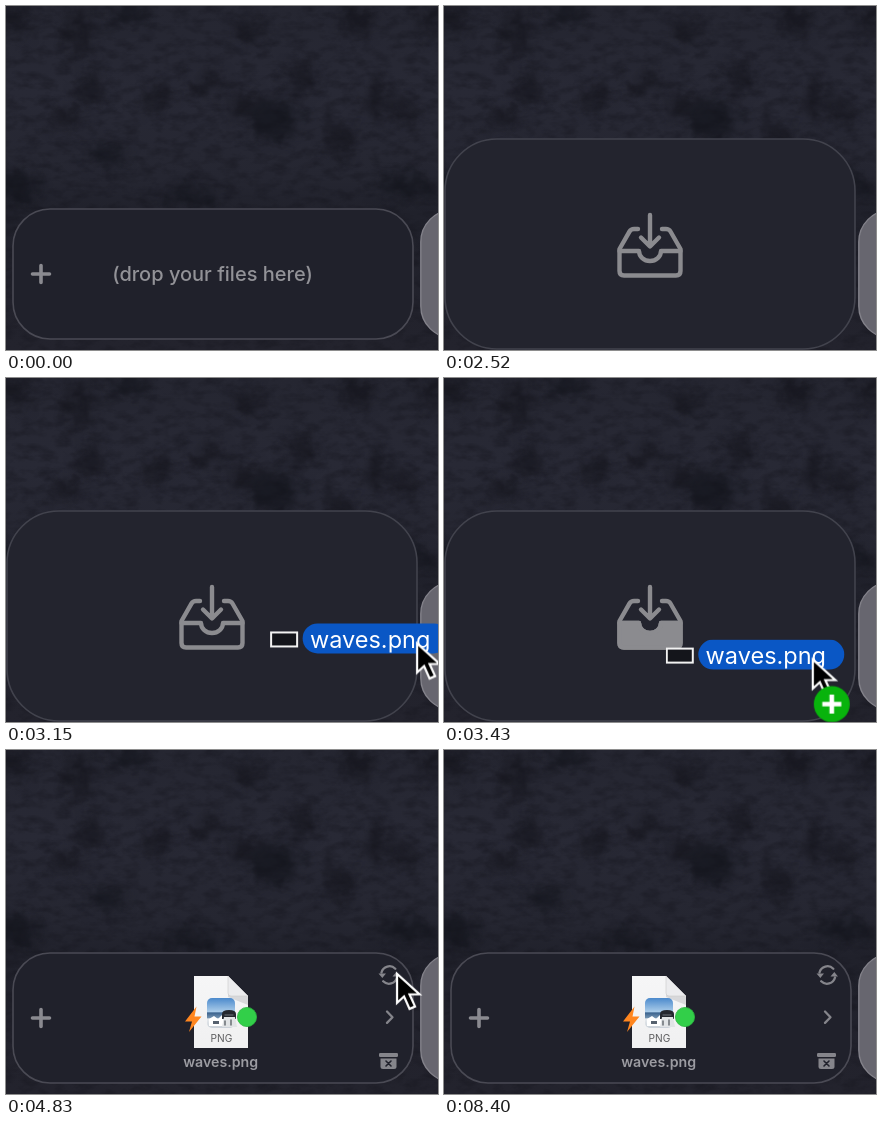
An HTML page that plays this animation: 432 by 344 pixels, repeating every 8540 ms.

```html
<!DOCTYPE html>
<html lang="en">
<head>
<meta charset="utf-8">
<title>Drop shelf</title>
<style>
  html, body { margin: 0; width: 100%; height: 100%; overflow: hidden; background: #20212b; }
  svg { display: block; width: 432px; height: 344px; }
  text { font-family: Inter, Roboto, sans-serif; text-anchor: middle; }

  .anim { animation: 8540ms linear infinite; }
  .hard { animation-timing-function: step-end; }
  .line { fill: none; stroke-linecap: round; stroke-linejoin: round; }

  #panel { animation-name: panel; stroke-width: 1.6; }
  #hint { animation-name: hint; }
  #plus { animation-name: plus; }
  #tray { animation-name: tray; }
  #trayFill { animation-name: hover; }
  #shelf { animation-name: shelf; }
  #file { animation-name: file; transform-origin: 215px 262px; }
  #pointer { animation-name: pointer; }
  #label { animation-name: label; }
  #badge { animation-name: hover; }

  @keyframes panel {
    0%, 22.1% { x: 7px; y: 203px; width: 400px; height: 130px; rx: 37px; fill: #20212b; stroke: #4a4a54;
      animation-timing-function: cubic-bezier(.2, .7, .2, 1); }
    27%, 43.1% { x: 1px; y: 133px; width: 410px; height: 210px; rx: 52px; fill: #23242e; stroke: #42434d;
      animation-timing-function: cubic-bezier(.2, .7, .2, 1); }
    45.6%, 100% { x: 7px; y: 203px; width: 400px; height: 130px; rx: 37px; fill: #20212b; stroke: #4a4a54; }
  }
  @keyframes hint {
    0%, 22.1% { opacity: 1; }
    24.2%, 100% { opacity: 0; }
  }
  @keyframes plus {
    0%, 22.1% { opacity: 1; }
    24.2%, 43.3% { opacity: 0; }
    45.6%, 100% { opacity: 1; }
  }
  @keyframes tray {
    0%, 22.9% { opacity: 0; }
    25.5%, 43.2% { opacity: 1; }
    44.4%, 100% { opacity: 0; }
  }
  @keyframes shelf {
    0%, 43.3% { opacity: 0; }
    45.6%, 100% { opacity: 1; }
  }
  @keyframes file {
    0%, 43.3% { transform: translateY(6px) scale(.7); animation-timing-function: ease-out; }
    45.8% { transform: translateY(3px); animation-timing-function: ease-out; }
    49.2%, 100% { transform: none; }
  }
  @keyframes pointer {
    0%, 32.5% { transform: translate(590px, 212px); }
    36.9% { transform: translate(411px, 265.5px); }
    40.15% { transform: translate(369px, 281.5px); animation-timing-function: ease-out; }
    42.6%, 54.6% { transform: translate(357.5px, 287.5px); animation-timing-function: ease-in-out; }
    59.3%, 100% { transform: translate(450px, 112px); }
  }
  @keyframes label {
    0%, 100% { opacity: 1; }
    43.3% { opacity: 0; }
  }
  @keyframes hover {
    0%, 100% { opacity: 0; }
    37.6% { opacity: 1; }
    43.3% { opacity: 0; }
  }
</style>
</head>
<body>
<svg viewBox="0 0 432 344">
  <defs>
    <linearGradient id="wall" x2="0" y2="1">
      <stop offset="0" stop-color="#252631"/>
      <stop offset=".25" stop-color="#282935"/>
      <stop offset=".5" stop-color="#252631"/>
      <stop offset=".6" stop-color="#20212b"/>
      <stop offset="1" stop-color="#23232d"/>
    </linearGradient>
    <linearGradient id="paper" x2="0" y2="1">
      <stop offset="0" stop-color="#f6f6f7"/>
      <stop offset="1" stop-color="#f0f0f1"/>
    </linearGradient>
    <linearGradient id="scene" x2="0" y2="1">
      <stop offset="0" stop-color="#4b89cc"/>
      <stop offset=".45" stop-color="#a9cbe9"/>
      <stop offset=".5" stop-color="#3d648f"/>
      <stop offset=".65" stop-color="#6f8fae"/>
      <stop offset=".7" stop-color="#e8ebee"/>
      <stop offset="1" stop-color="#c9d0d8"/>
    </linearGradient>
    <clipPath id="picture"><rect x="201" y="248" width="28" height="30" rx="5"/></clipPath>
    <filter id="ragged" filterUnits="userSpaceOnUse" x="-30" y="-30" width="492" height="404" color-interpolation-filters="sRGB">
      <feGaussianBlur stdDeviation="7" result="blur"/>
      <feTurbulence type="fractalNoise" baseFrequency=".06" numOctaves="3" seed="4"/>
      <feDisplacementMap in="blur" scale="26" xChannelSelector="R" yChannelSelector="G"/>
    </filter>
    <filter id="grain" x="0" y="0" width="100%" height="100%" color-interpolation-filters="sRGB">
      <feTurbulence type="fractalNoise" baseFrequency=".06 .12" numOctaves="4" seed="9"/>
      <feColorMatrix values="0 0 0 0 .07  0 0 0 0 .07  0 0 0 0 .1  .9 0 0 0 -.36"/>
    </filter>
  </defs>

  <rect width="432" height="344" fill="url(#wall)"/>
  <rect width="432" height="344" filter="url(#grain)"/>
  <g id="blotches" filter="url(#ragged)" fill="#101118" fill-opacity=".6"/>

  <rect x="414.8" y="204" width="120" height="128" rx="32" fill="#67666f" stroke="#83828a" stroke-width="1.4"/>
  <rect id="panel" class="anim"/>

  <text id="hint" class="anim" x="206.5" y="275" font-size="20" font-weight="500" fill="#929297">(drop your files here)</text>
  <path id="plus" class="anim line" d="M26.500 268h17M35 259.500v17" stroke="#8a8a90" stroke-width="3.6"/>

  <g id="tray" class="anim line" stroke="#8b8b8f" stroke-width="4.4">
    <path id="trayFill" class="anim hard" fill="#8b8b8f" d="M175.500 245H195a11 10 0 0 0 22 0h19.500v20q0 4.500-4.500 4.500h-52q-4.500 0-4.500-4.500z"/>
    <path d="M194 223h-4q-3 0-4.500 2.500L175.500 243v22q0 4.500 4.500 4.500h52q4.500 0 4.500-4.500v-22l-10-17.500q-1.500-2.500-4.500-2.500h-4"/>
    <path d="M175.500 245H195a11 10 0 0 0 22 0h19.500"/>
    <path d="M206 209v31M197 231.500l9 9 9-9"/>
  </g>

  <g id="shelf" class="anim">
    <g class="line" stroke="#85858b" stroke-width="2.3">
      <path d="M375.500 222.500a8.200 8.200 0 0 1 13.800-3.800M391 227.500a8.200 8.200 0 0 1-13.800 3.800"/>
      <path d="M381 261.500l5.500 5.700-5.500 5.700"/>
    </g>
    <path fill="#85858b" d="M372.500 223.500h7.500l-3.700 4.500zM386.500 226.500h7.500l-3.700-4.500z"/>
    <g fill="#85858b">
      <rect x="373" y="303" width="19" height="4" rx="1.2"/>
      <path d="M374.500 308.500h16v8q0 2.500-2.500 2.500h-11q-2.500 0-2.500-2.500z"/>
    </g>
    <path class="line" stroke="#20212b" stroke-width="1.6" d="M380 311l5 5m0-5l-5 5"/>

    <g id="file" class="anim">
      <path d="M188 226h34l20 20v52h-54z" fill="url(#paper)"/>
      <path d="M222 227l20 20v8l-20-8z" fill="#d8d8da"/>
      <path d="M222 226l20 20h-17q-3 0-3-3z" fill="#ececee" stroke="#c9c9cc" stroke-width=".6"/>
      <g clip-path="url(#picture)">
        <rect x="201" y="248" width="28" height="30" fill="url(#scene)"/>
        <path d="M203 269l5-3 4 3 4-4 3 11h-16z" fill="#fff"/>
        <path d="M207 271h6v3h-6z" fill="#56616e"/>
      </g>
      <path d="M216 264q0-4 7-4t7 4v5h-14z" fill="#23272e"/>
      <path d="M218 267h11l2 10h-15z" fill="#e1e4e6"/>
      <path class="line" d="M219 265h8M219 271v4M225 270v5" stroke="#555b62" stroke-width="1.3"/>
      <text x="215.500" y="291.700" font-size="10.2" fill="#5e5e60">PNG</text>
      <path d="M190.500 256.500L179 271.500h7l-3 10.500 12.500-15.500h-7z" fill="#ff861f"/>
      <circle cx="241" cy="267" r="9.600" fill="#32cf49" stroke="#2bb741" stroke-width=".8"/>
    </g>
    <text x="214.700" y="316.500" font-size="14.200" font-weight="600" fill="#9c9ca2">waves.png</text>
  </g>

  <g id="pointer" class="anim">
    <g id="label" class="anim hard">
      <rect x="-146" y="-11" width="26" height="14" fill="#14151b" stroke="#f2f2f2" stroke-width="2"/>
      <rect x="-114.500" y="-20" width="146" height="30" rx="15" fill="#0a57c5"/>
      <text x="-47" y="4.500" font-size="23.5" fill="#fff">waves.png</text>
    </g>
    <path d="M0 0v29l7-6.500 5.500 12.500 5.500-2.400-5.500-12.100h10z" fill="#000" stroke="#fff" stroke-width="2.2"/>
    <g id="badge" class="anim hard">
      <circle cx="19" cy="44.500" r="18" fill="#08b30c"/>
      <path d="M9.500 44.500h19M19 35v19" stroke="#fff" stroke-width="4.6"/>
    </g>
  </g>
</svg>
<script>
  // Dark patches of the wallpaper: centre x, centre y, radius x, radius y.
  const patches = [
    [73, 28, 10, 24], [8, 14, 12, 16], [122, 8, 18, 10], [200, 78, 16, 10], [268, 114, 26, 20],
    [295, 72, 14, 14], [236, 97, 14, 12], [370, 92, 12, 20], [396, 104, 12, 12], [335, 135, 14, 16],
    [85, 82, 12, 14], [62, 112, 16, 10], [150, 92, 12, 12], [100, 150, 18, 10], [12, 180, 20, 18],
    [185, 190, 26, 9], [350, 14, 16, 14], [425, 14, 10, 18], [240, 24, 16, 9], [400, 180, 26, 12]
  ];
  document.getElementById('blotches').innerHTML = patches
    .map(([x, y, rx, ry]) => `<ellipse cx="${x}" cy="${y}" rx="${rx}" ry="${ry}"/>`)
    .join('');
</script>
</body>
</html>
```
